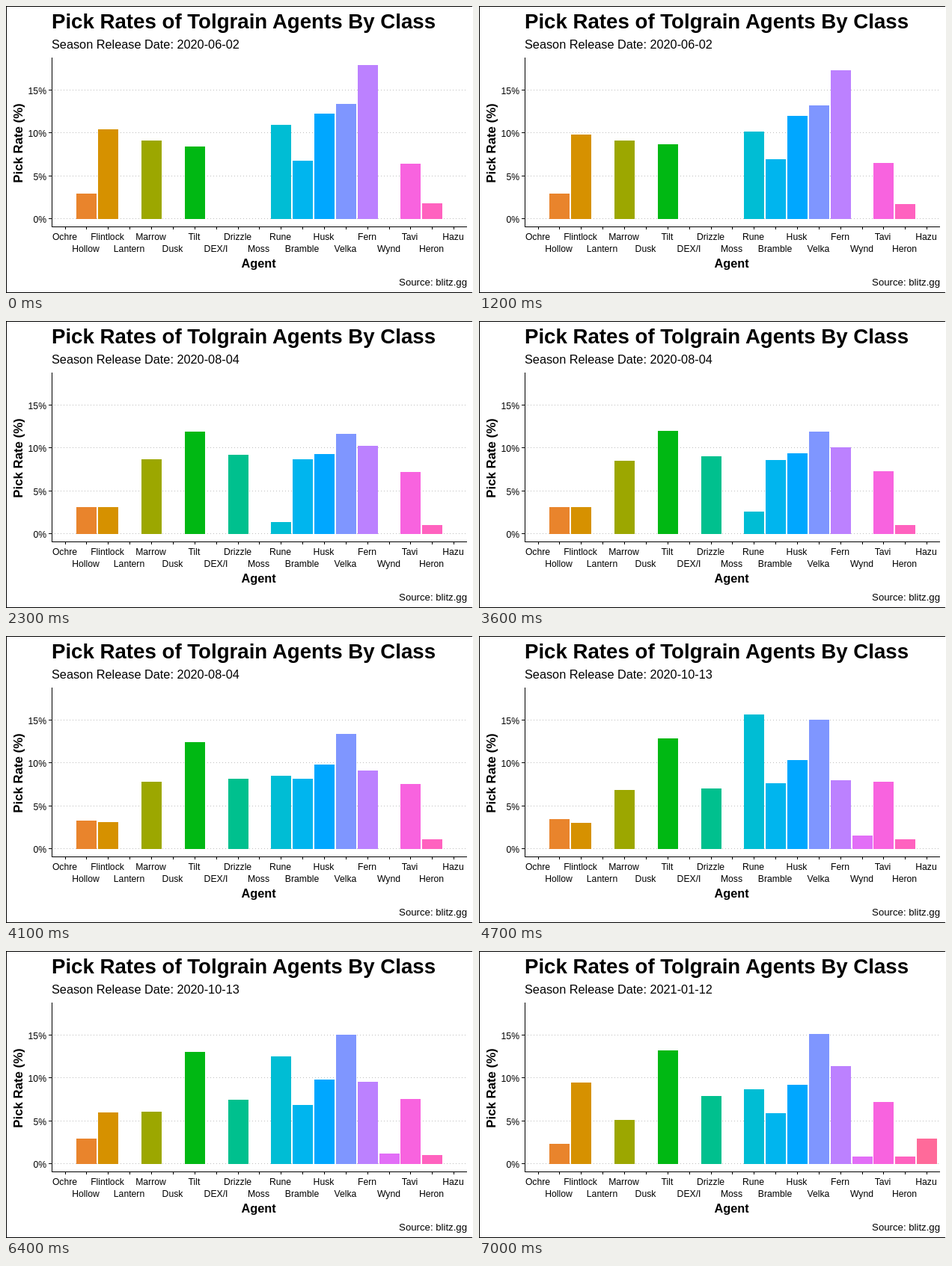
Animation, 624 px wide and 384 px high, one loop 8 s. Source, as an HTML page with a canvas:

```html
<!DOCTYPE html>
<html lang="en">
<head>
<meta charset="utf-8">
<title>Pick rates</title>
<style>
  html, body { margin: 0; width: 100%; height: 100%; overflow: hidden; background: #fff; }
  canvas, svg { position: absolute; left: 0; top: 0; display: block; }
  text { font-family: "Liberation Sans", Arial, sans-serif; font-size: 12.2px; fill: #000; }
  .title { font-size: 27.65px; font-weight: bold; }
  .sub { font-size: 16.3px; }
  .axis { font-size: 16.3px; font-weight: bold; }
  .side { font-size: 16.8px; }
  .note { font-size: 13.2px; }
  .mid { text-anchor: middle; }
  .end { text-anchor: end; }
</style>
</head>
<body>
<canvas id="chart" width="624" height="384"></canvas>
<svg id="labels" width="624" height="384">
  <text class="title" x="61" y="30">Pick Rates of Tolgrain Agents By Class</text>
  <text class="sub" x="61" y="57">Season Release Date: <tspan id="date"></tspan></text>
  <text class="axis mid" x="337.5" y="350">Agent</text>
  <text class="axis side mid" transform="translate(22 183.5) rotate(-90)">Pick Rate (%)</text>
  <text class="note end" x="616" y="374">Source: blitz.gg</text>
</svg>
<script>
const LOOP = 8000, STEP = 100, BASE = 284;
const ctx = document.getElementById("chart").getContext("2d");
const labels = document.getElementById("labels");
const date = document.getElementById("date");

const names = ["Ochre", "Hollow", "Flintlock", "Lantern", "Marrow", "Dusk", "Tilt",
  "DEX/I", "Drizzle", "Moss", "Rune", "Bramble", "Husk", "Velka", "Fern", "Wynd",
  "Tavi", "Heron", "Hazu"];

// slot, colour, bar top at each season (0 = not yet released)
const bars = [
  [1, "#E9842C", 251, 249, 245, 258],
  [2, "#D69100", 165, 249, 250, 176],
  [4, "#9CA700", 180, 185, 206, 226],
  [6, "#00B813", 188, 148, 137, 133],
  [8, "#00C08E", 0, 179, 204, 194],
  [10, "#00BDD4", 159, 269, 105, 185],
  [11, "#00B5EE", 207, 185, 197, 217],
  [12, "#00A7FF", 144, 178, 166, 179],
  [13, "#7F96FF", 131, 151, 112, 111],
  [14, "#BC81FF", 79, 167, 193, 154],
  [15, "#E26EF7", 0, 0, 267, 275],
  [16, "#F863DF", 211, 202, 195, 202],
  [17, "#FF62BF", 264, 273, 272, 275],
  [18, "#FF6A9A", 0, 0, 0, 251]
];
const dates = ["2020-06-02", "2020-08-04", "2020-10-13", "2021-01-12"];
const moves = [[1200, 12], [3600, 12], [6000, 11]]; // start, steps

const left = i => Math.floor(66.13 + 28.86 * i);
const gridY = k => Math.round(BASE - k * 57.33);

function addText(str, x, y, cls) {
  const el = document.createElementNS("http://www.w3.org/2000/svg", "text");
  el.setAttribute("x", x);
  el.setAttribute("y", y);
  el.setAttribute("class", cls);
  el.textContent = str;
  labels.appendChild(el);
}
names.forEach((name, i) => addText(name, left(i) + 12.5, i % 2 ? 329 : 313, "mid"));
for (let k = 0; k < 4; k++) addText(k * 5 + "%", 54, gridY(k) + 6, "end");

function rect(color, x, y, w, h) {
  ctx.fillStyle = color;
  ctx.fillRect(x, y, w, h);
}

// Season index and progress towards the next season
function stateAt(t) {
  let season = 0;
  for (const [start, steps] of moves) {
    if (t < start) break;
    const n = Math.floor((t - start) / STEP) + 1;
    if (n < steps) return [season, n / steps];
    season++;
  }
  return [season, 0];
}

function draw(t) {
  const [season, f] = stateAt(t);
  rect("#fff", 0, 0, 624, 384);
  for (let k = 0; k < 4; k++) {
    for (let x = 61; x < 616; x += 4) rect("#bebebe", x, gridY(k), 1, 1);
  }
  for (const [slot, color, ...tops] of bars) {
    const a = tops[season];
    if (!a) continue;
    // halves round upwards on screen
    const y = f ? Math.ceil(a + (tops[season + 1] - a) * f - 0.5) : a;
    rect(color, left(slot), y, 27, BASE + 1 - y);
  }
  rect("#000", 61, 69, 1, 227);
  rect("#000", 61, 295, 555, 1);
  for (let k = 0; k < 4; k++) rect("#000", 57, gridY(k), 4, 1);
  names.forEach((_, i) => rect("#000", left(i) + 13, 296, 1, 3));

  // frame, open on the right
  rect("#000", 0, 0, 623, 1);
  rect("#000", 0, 383, 623, 1);
  rect("#000", 0, 0, 1, 384);

  const label = dates[f > 0.5 ? season + 1 : season];
  if (date.textContent !== label) date.textContent = label;
}

function tick() {
  draw(performance.now() % LOOP);
  requestAnimationFrame(tick);
}
tick();
</script>
</body>
</html>
```
